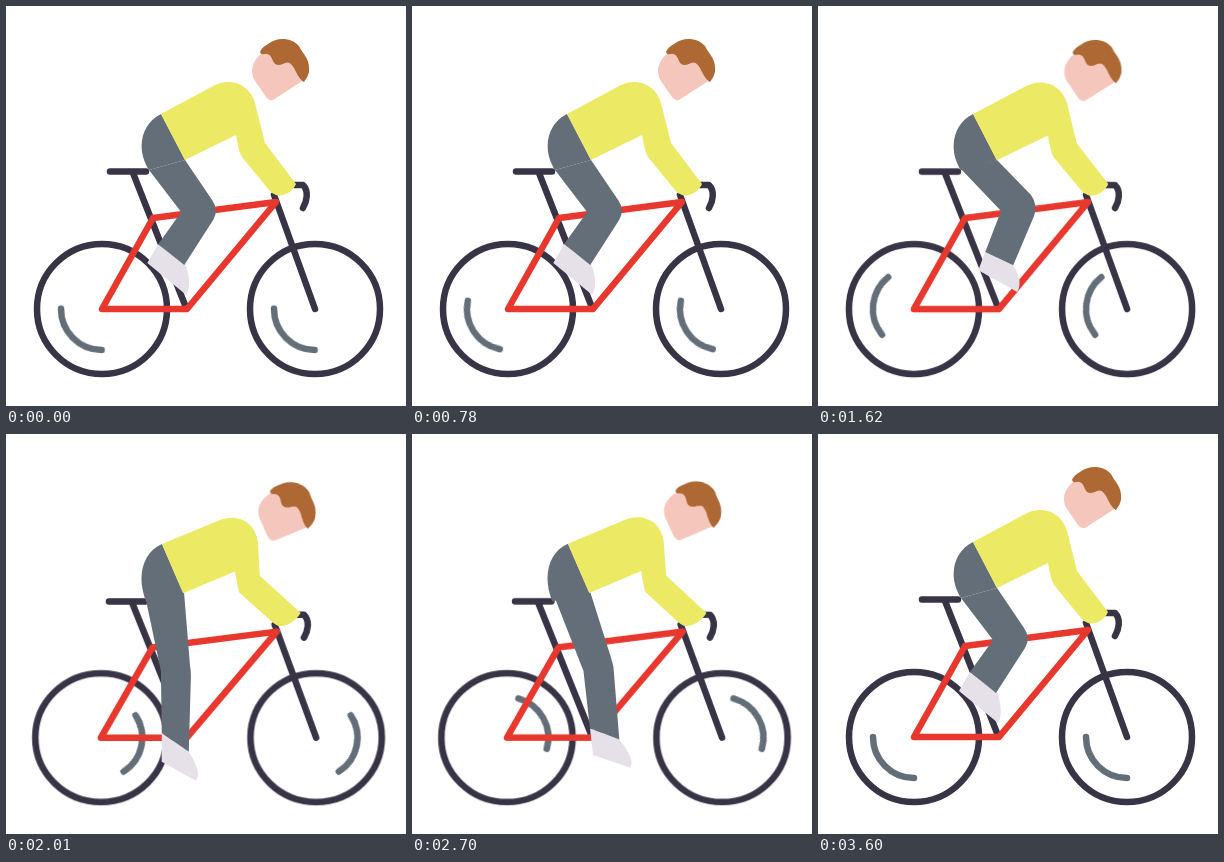
An HTML page without scripts for the animation above (3630 ms loop, 400 by 400 pixels).

```html
<!DOCTYPE html>
<html lang="en">
<head>
<meta charset="utf-8">
<title>Cyclist</title>
<style>
  html, body { margin: 0; width: 100%; height: 100%; overflow: hidden; background: #fff; }
  svg { display: block; width: 100vw; height: 100vh; }

  .line { fill: none; stroke-width: 6.5; stroke-linecap: round; stroke-linejoin: round; }
  .dark { stroke: #393346; }
  .red { stroke: #e8382e; }
  .gray { stroke: #646e78; }
  .pants { fill: #646e78; }

  .spin { animation: spin 3630ms linear infinite; }
  .bob { --low: none; animation: bob 3630ms cubic-bezier(.364, 0, .636, 1) infinite; }
  .pedal { animation: pedal 3630ms linear infinite; }

  .bike { --low: scale(1.011, .99); transform-origin: 202px 371px; }
  .head { --low: translate(6.8px, 15.7px) rotate(11deg); transform-origin: 275px 64px; }
  .hip {
    --up: path("M155 108C136 117 129 142 143 164L179 154Z");
    --down: path("M156 110C137 118 130 142 140 168L177 159Z");
  }
  .shirt {
    fill: #ece965;
    --up: path("M155 108L209 79C226 71 246 79 250 101L259 137L290 178C286 187 276 191 270 189Q266 188 263 184L236 151Q233 147 230 129L179 154Z");
    --down: path("M156 110L213 87C232 79 250 89 252 109L253.5 142L295 179C288 190 278 193 272 192Q268 190 265 187L233 159Q232 156 229 138L177 159.5Z");
  }
  .leg {
    --a: path("M143 164L175 206L152 238L178 259L207 214Q213 204 206 194L179 154Z");
    --b: path("M143 163L183 205L167 246L195 259L216 210Q220 199 213 189L179 154Z");
    --c: path("M143 163L184 205L174 249L202 263L217 210Q221 199 214 189L179 154Z");
    --d: path("M144 165L182 220L184 271L214 281L215 218Q216 211 211 202L179 155Z");
    --e: path("M144 166L176 237L184 293L214 302L206 231Q205 227 203 221L178 157Z");
    --f: path("M137 152L155 237L156 299L183 318L185 242Q185 237 184 231L178 158Z");
    --g: path("M137 152L149 236L139 291L166 308L180 243Q181 238 181 232L178 157Z");
    --h: path("M139 158L160 222L133 262L159 282L192 229Q196 222 193 212L178 156Z");
  }
  .foot {
    fill: #e6e0e9;
    --a: path("M152 238L141 257L180 289Q186 278 179 258Z");
    --b: path("M167 246L160 264L199 286Q205 275 195 259Z");
    --c: path("M174 249L170 268L209 286Q214 278 202 263Z");
    --d: path("M184 271L182 292L220 307Q224 299 214 281Z");
    --e: path("M184 293L188 319L226 330Q231 322 214 302Z");
    --f: path("M156 299L156 328L190 347Q197 340 183 318Z");
    --g: path("M139 291L135 315L170 338Q175 328 166 308Z");
    --h: path("M133 262L124 283L161 309Q167 298 159 282Z");
  }

  /* Steady riding, then coasting to a stop */
  @keyframes spin {
    0% { transform: rotate(0deg); }
    66.94% { transform: rotate(1156deg); animation-timing-function: cubic-bezier(.33, .65, .58, 1); }
    99.17%, 100% { transform: rotate(1440deg); }
  }
  @keyframes bob {
    0%, 21.49%, 42.98%, 64.46%, 99.17%, 100% { transform: none; d: var(--up); }
    10.74%, 32.23%, 53.72%, 77.13% { transform: var(--low); d: var(--down); }
  }
  @keyframes pedal {
    0%, 21.49%, 42.98%, 64.46%, 99.17%, 100% { d: var(--a); }
    1.65%, 23.14%, 44.63%, 66.12% { d: var(--b); }
    2.48%, 23.97%, 45.45%, 66.94% { d: var(--c); }
    5.37%, 26.86%, 48.35%, 69.97% { d: var(--d); }
    8.26%, 29.75%, 51.24%, 73.28% { d: var(--e); }
    12.4%, 33.88%, 55.37%, 78.51% { d: var(--f); }
    14.46%, 35.95%, 57.44%, 82.64% { d: var(--g); }
    17.91%, 39.39%, 60.88%, 88.98% { d: var(--h); }
  }
</style>
</head>
<body>
<svg viewBox="0 0 400 400">
  <g class="bike bob">
    <g transform="translate(96 303)">
      <circle class="line dark" r="65"/>
      <path class="line gray spin" d="M-41 0A41 41 0 0 0 0 41"/>
    </g>
    <g transform="translate(309 303)">
      <circle class="line dark" r="65"/>
      <path class="line gray spin" d="M-41 0A41 41 0 0 0 0 41"/>
    </g>
    <path class="line dark" d="M104 165.500H140M127 167L179 299M268 189L309 303M288 179H297C303 185 301 195 297 202"/>
    <path class="line red" d="M96 303L147 212L270 196L181 303Z"/>
  </g>

  <path class="foot pedal"/>
  <path class="pants leg pedal"/>
  <path class="pants hip bob"/>
  <path class="shirt bob"/>

  <g class="head bob">
    <path fill="#f5c6bb" d="M258 46C246 53 243 66 249 75L260 91Q264 97 270 92L298 74L290 50Z"/>
    <path fill="#ad6833" d="M254 46Q256 41 262 38C272 30 286 32 293 40C298 50 304 52 303 66Q302 71 298 76Q294 74 290 66Q285 54 279 57Q270 62 267 55Q264 46 258 48Q255 49 254 46Z"/>
  </g>
</svg>
</body>
</html>
```
